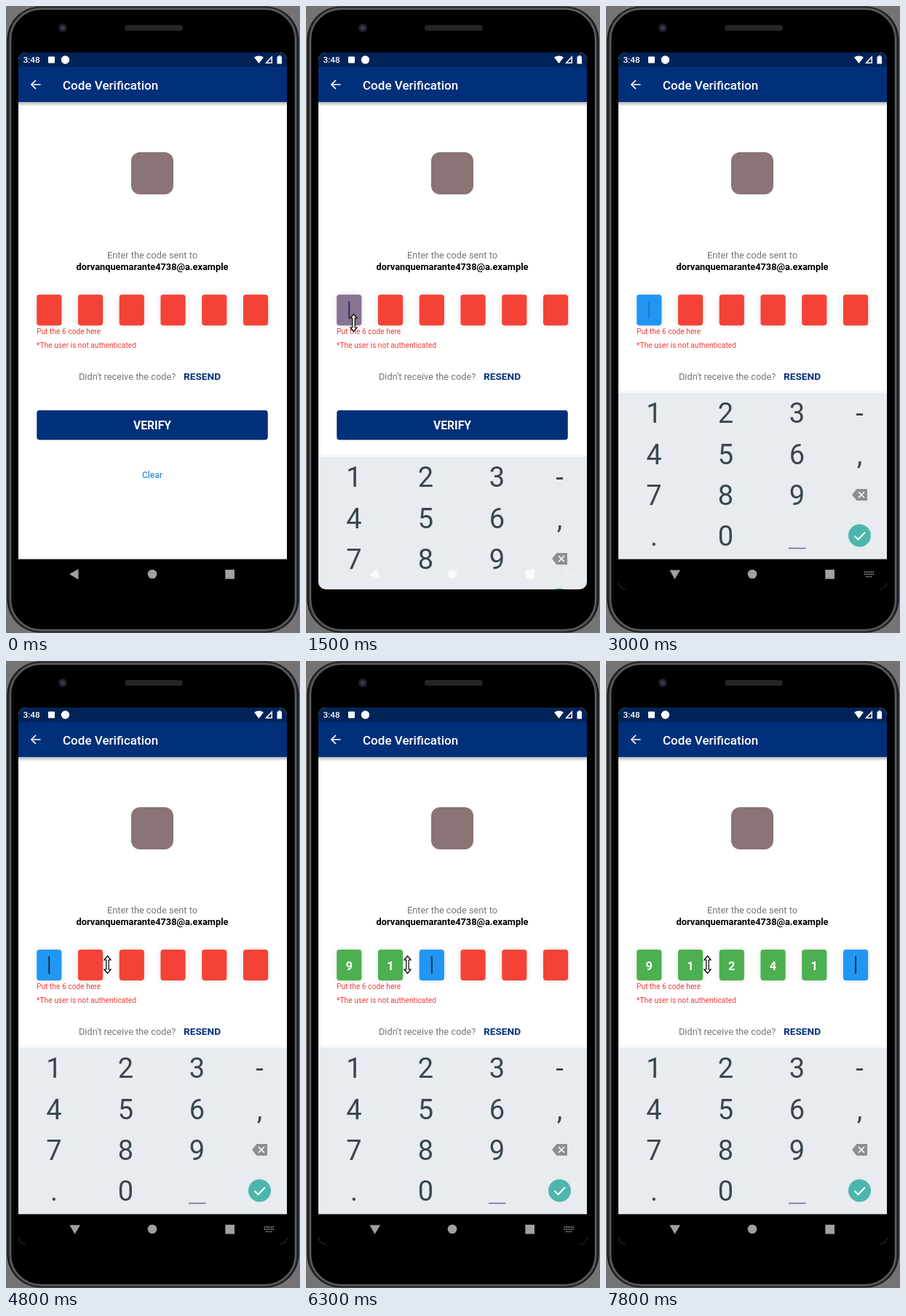
An HTML page for the animation above (8000 ms loop, 404 px wide and 862 px high).

```html
<!DOCTYPE html>
<html lang="en">
<head>
<meta charset="utf-8">
<title>Code verification</title>
<style>
  html, body { margin: 0; width: 100%; height: 100%; overflow: hidden; background: #747475; }
  svg { display: block; width: 404px; height: 862px; }
  text { font-family: Roboto, sans-serif; }
  .mid { text-anchor: middle; }
  .bold { font-weight: 700; }
  .medium { font-weight: 500; }
  .note { font-size: 10.25px; fill: #f23b35; }
  .body { font-size: 12.75px; fill: #757575; }
  .key { font-size: 38px; fill: #37474f; text-anchor: middle; }
  .digit { font-size: 16.5px; fill: #fff; font-weight: 700; text-anchor: middle; }
</style>
</head>
<body>
<svg viewBox="0 0 404 862">
  <defs>
    <clipPath id="screen"><rect x="17" y="64" width="369" height="738" rx="10"/></clipPath>
    <filter id="soft" x="-40%" y="-40%" width="180%" height="180%"><feGaussianBlur stdDeviation="4"/></filter>
    <linearGradient id="shade" x2="0" y2="1">
      <stop stop-color="#000" stop-opacity=".34"/><stop offset="1" stop-color="#000" stop-opacity="0"/>
    </linearGradient>
  </defs>

  <!-- phone body -->
  <rect width="404" height="862" fill="#747475"/>
  <rect x="1.5" y=".5" width="401" height="861" rx="46" fill="#0c0c0e"/>
  <g fill="#000">
    <rect x="6" y="4" width="392" height="854" rx="42" stroke="#2c2d30" stroke-width="6"/>
    <rect x="6" y="4" width="392" height="854" rx="42" stroke="#5a5b5f" stroke-width="2.500"/>
  </g>
  <rect x="163" y="26" width="80" height="8" rx="4" fill="#252527"/>
  <circle cx="78" cy="30" r="6" fill="#1e1f24"/>
  <circle cx="78" cy="30" r="3" fill="#343b4c"/>

  <g clip-path="url(#screen)">
    <rect x="17" y="64" width="369" height="697" fill="#fff"/>
    <rect x="17" y="131" width="369" height="7" fill="url(#shade)"/>
    <rect x="17" y="64" width="369" height="20" fill="#002458"/>
    <rect x="17" y="84" width="369" height="48" fill="#00307a"/>

    <!-- status bar -->
    <g fill="#fff">
      <text class="medium" x="23.5" y="78.3" font-size="11.8">3:48</text>
      <rect x="58" y="69.5" width="9" height="9" rx="1"/>
      <circle cx="81.500" cy="74" r="5.700"/>
      <path d="M341 70.500Q347.500 66.500 354 70.500L347.500 79Z"/>
      <path d="M366 68V79H356Z"/>
      <path d="M372.500 69.500H374.500V68H377.500V69.500H379V79.500H372.500Z"/>
    </g>
    <path d="M359.500 77.500L364.500 72V77.500Z" fill="#002458"/>

    <!-- app bar -->
    <path d="M47.500 108H35.500M41 102L35 108L41 114" fill="none" stroke="#fff" stroke-width="1.700"/>
    <text class="medium" x="78" y="114.500" font-size="17.050" fill="#fff">Code Verification</text>

    <rect x="172" y="201" width="58" height="58" rx="12" fill="#8a7476"/>

    <text class="body mid" x="201" y="347">Enter the code sent to</text>
    <text class="bold mid" x="201" y="362.700" font-size="12.800">dorvanquemarante4738@a.example</text>

    <g id="cells"></g>
    <rect id="caret" y="406" width="1.800" height="24" fill="#0c1a2c"/>

    <text class="note" x="42" y="451">Put the 6 code here</text>
    <text class="note" x="42" y="469.500">*The user is not authenticated</text>
    <text class="body" x="100" y="514">Didn't receive the code?</text>
    <text class="bold" x="244" y="514.200" font-size="13.700" fill="#00307a">RESEND</text>

    <rect x="42.300" y="555.700" width="317.500" height="40.800" rx="4" fill="#00307a"/>
    <text class="bold mid" x="201" y="582" font-size="15.700" fill="#fff">VERIFY</text>
    <text class="medium mid" x="201" y="649" font-size="12" fill="#3a8fd6">Clear</text>

    <rect x="17" y="760.500" width="369" height="42" fill="#000"/>
    <g id="keypad">
      <rect x="17" y="529" width="369" height="4" fill="#000" opacity=".03"/>
      <rect x="17" y="532" width="369" height="270" fill="#e8ebf0"/>
      <g id="keys"></g>
      <path d="M251 745.500H274.500" stroke="#5b719c" stroke-width="1.500"/>
      <path d="M338 672L344.500 664H359V680H344.500Z" fill="#8a8f94"/>
      <path d="M347 668L355 676M355 668L347 676" stroke="#fff" stroke-width="1.700"/>
      <circle cx="348.500" cy="728" r="15.500" fill="#4db6ac"/>
      <path d="M341.500 728.500L346.500 733.500L356 723.500" fill="none" stroke="#fff" stroke-width="2"/>
    </g>
    <rect id="navCover" x="17" y="760.500" width="369" height="42" fill="#000"/>
    <g id="nav">
      <path id="back" d="M87 781L99.500 774V788.500Z"/>
      <circle cx="201" cy="781" r="6.300"/>
      <rect x="301.300" y="775" width="12.700" height="12.700"/>
      <path id="switcher" d="M354.500 778.200H368M354.500 781.200H368M357 784.400H365.500" fill="none" stroke-width="1.500" stroke-dasharray="1.500 .9"/>
    </g>
  </g>

  <path id="pointer" d="M0 -12L4.500 -6.500H1.700V6.500H4.500L0 12L-4.500 6.500H-1.700V-6.500H-4.500Z" fill="#fff" stroke="#000" stroke-width="1.200"/>
</svg>
<script>
const LOOP = 8000, FOCUS = 1500, KEYPAD_UP = 1800, SWITCHER_OFF = 7800;
const RED = '#f44336', BLUE = '#2196f3', GREEN = '#4caf50', FADING = '#887494';
const entries = [[5000, 9], [6000, 1], [6500, 2], [7000, 4], [7500, 1]];
const $ = id => document.getElementById(id);

function add(parent, tag, attrs, text = '') {
  const el = document.createElementNS('http://www.w3.org/2000/svg', tag);
  for (const name in attrs) el.setAttribute(name, attrs[name]);
  el.textContent = text;
  return parent.appendChild(el);
}
const show = (id, on) => $(id).setAttribute('visibility', on ? 'visible' : 'hidden');

const cells = Array.from({ length: 6 }, (_, i) => {
  const x = 42.2 + 56.75 * i;
  const shape = { x, y: 396.8, width: 34.2, height: 42.4, rx: 4 };
  add($('cells'), 'rect', { ...shape, opacity: .13, filter: 'url(#soft)' });
  return {
    x,
    box: add($('cells'), 'rect', shape),
    label: add($('cells'), 'text', { x: x + 17, y: 424.5, class: 'digit' })
  };
});

['123-', '456,', '789', '.0'].forEach((row, r) =>
  [...row].forEach((key, c) =>
    add($('keys'), 'text', { x: [66, 164.5, 262.5, 348.5][c], y: 573.4 + 56.3 * r, class: 'key' }, key)));

function caretOpacity(t) {
  if (t < FOCUS) return 0;
  if (t < KEYPAD_UP) return .8;
  const last = entries.filter(([at]) => at <= t).pop();
  const phase = (last ? t - last[0] : t + 500) % 1000;
  return phase < 500 ? .9 : phase < 800 ? .25 : 0;
}

function pointerAt(t) {
  if (t >= 1000 && t < 2300) return [65.5, 435.5];
  if (t >= 3800) return [139.5, 417.5];
}

function render(t) {
  const typed = entries.filter(([at]) => at <= t).length;
  cells.forEach(({ box, label }, i) => {
    const focused = t >= FOCUS && i === typed;
    box.setAttribute('fill', i < typed ? GREEN : !focused ? RED : t < KEYPAD_UP ? FADING : BLUE);
    label.textContent = i < typed ? entries[i][1] : '';
  });
  $('caret').setAttribute('x', cells[typed].x + 16.2);
  $('caret').setAttribute('opacity', caretOpacity(t));

  const sliding = t >= FOCUS && t < KEYPAD_UP;
  const up = t >= KEYPAD_UP;
  show('keypad', sliding || up);
  show('navCover', up);
  show('switcher', t >= FOCUS && t < SWITCHER_OFF);
  $('keypad').setAttribute('transform', `translate(0 ${sliding ? 88 : 0})`);
  $('back').setAttribute('transform', up ? 'translate(.5 0) rotate(-90 94 781)' : sliding ? 'rotate(-12 94 781)' : '');
  $('nav').setAttribute('fill', sliding ? '#fafafa' : '#a0a0a0');
  $('switcher').setAttribute('stroke', sliding ? '#f6f6f6' : '#a0a0a0');

  const at = pointerAt(t);
  show('pointer', at);
  if (at) $('pointer').setAttribute('transform', `translate(${at})`);
}

const start = performance.now();
function tick() {
  render((performance.now() - start) % LOOP);
  requestAnimationFrame(tick);
}
tick();
</script>
</body>
</html>
```
